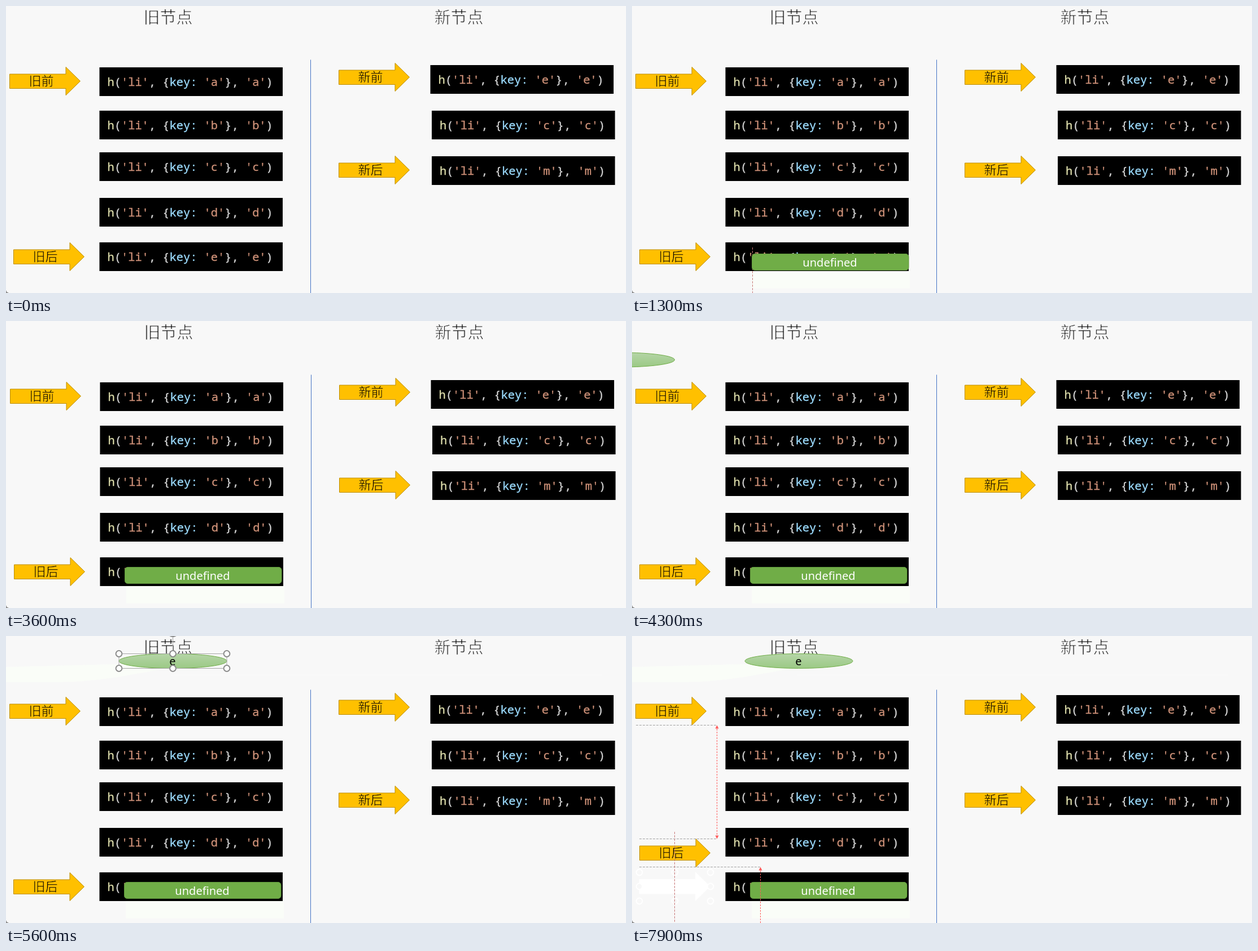
These frames come from a looping animation (1098 px wide and 510 px high, 8000 ms). An HTML page with a canvas:

```html
<!DOCTYPE html>
<html lang="zh-CN">
<head>
<meta charset="utf-8">
<title>新旧节点对比</title>
<style>
html, body { margin: 0; width: 100%; height: 100%; overflow: hidden; background: #f8f8f8; }
canvas { display: block; }
</style>
</head>
<body>
<canvas id="stage" width="1098" height="510"></canvas>
<script>
const ctx = document.getElementById('stage').getContext('2d');
const LOOP = 8000, STEP = 100;
const CJK = '"Noto Sans CJK SC", "Noto Sans CJK", sans-serif';
const MONO = '20.37px "Noto Sans Mono", monospace';
const SANS = '20px "Noto Sans", sans-serif';
const CELL = 12.222;
const PAPER = '#f8f8f8', AMBER = '#ffc000', GUIDE = '#c87a7a';

const oldNodes = [['a', 165.5, 109], ['b', 165.5, 186], ['c', 165.5, 260], ['d', 165.5, 341], ['e', 165.5, 420]];
const newNodes = [['e', 751.5, 105], ['c', 754, 186], ['m', 754, 267]];

// Keyframes: time, x, y
const tagPath = [[500, 213, 503], [600, 213, 494], [700, 213, 472], [800, 213, 441],
  [1300, 213, 441], [1400, 211, 439], [1500, 210, 438]];
const bubblePath = [[4200, -85, 69], [4300, -20, 69], [4400, 70, 68], [4500, 140, 66], [4600, 197, 63],
  [4800, 253, 55], [4900, 253, 55], [5000, 262, 53], [5400, 295.5, 44.5]];
const pointerPath = [[7600, 13, 420], [7700, 13, 404], [7800, 13, 374], [7900, 13, 360]];

function track(keys, t) {
  if (t <= keys[0][0]) return keys[0].slice(1);
  for (let i = 1; i < keys.length; i++) {
    const [t0, x0, y0] = keys[i - 1], [t1, x1, y1] = keys[i];
    if (t <= t1) {
      const k = (t - t0) / (t1 - t0);
      return [x0 + (x1 - x0) * k, y0 + (y1 - y0) * k];
    }
  }
  return keys[keys.length - 1].slice(1);
}

function text(str, x, y, font, color, align = 'center') {
  ctx.font = font;
  ctx.fillStyle = color;
  ctx.textAlign = align;
  ctx.fillText(str, x, y);
}

// An outline in the ground colour thins the strokes; in the text colour it thickens them
function outlinedText(str, x, y, font, color, outline, width, align) {
  text(str, x, y, font, color, align);
  ctx.strokeStyle = outline;
  ctx.lineWidth = width;
  ctx.lineJoin = 'round';
  ctx.strokeText(str, x, y);
  ctx.lineJoin = 'miter';
}

function line(x0, y0, x1, y1, color, dash = []) {
  ctx.save();
  ctx.strokeStyle = color;
  ctx.lineWidth = 1;
  ctx.setLineDash(dash);
  ctx.beginPath();
  ctx.moveTo(x0, y0);
  ctx.lineTo(x1, y1);
  ctx.stroke();
  ctx.restore();
}

function polygon(points, fill, stroke) {
  ctx.beginPath();
  points.forEach(([x, y]) => ctx.lineTo(x, y));
  ctx.closePath();
  paint(fill, stroke);
}

function paint(fill, stroke, width = 1) {
  if (fill) { ctx.fillStyle = fill; ctx.fill(); }
  if (stroke) { ctx.strokeStyle = stroke; ctx.lineWidth = width; ctx.stroke(); }
}

function title(str, x) {
  outlinedText(str, x, 30.5, '300 29px ' + CJK, '#1a1a1a', PAPER, 0.9);
}

function codeBox([key, x, y]) {
  ctx.fillStyle = '#000';
  ctx.fillRect(x, y, 324.5, 51);
  const parts = [['h', '#dcdcaa'], ['(', '#d4d4d4'], ["'li'", '#ce9178'], [', {', '#d4d4d4'],
    ['key:', '#9cdcfe'], [' ', '#d4d4d4'], [`'${key}'`, '#ce9178'], ['}, ', '#d4d4d4'],
    [`'${key}'`, '#ce9178'], [')', '#d4d4d4']];
  let px = x + 14;
  for (const [str, color] of parts) {
    outlinedText(str, px, y + 32.8, MONO, color, color, 0.35, 'left');
    px += str.length * CELL;
  }
}

function arrowPoints(x, y) {
  return [[0, 12.5], [99.5, 12.5], [99.5, 0], [125, 25], [99.5, 50], [99.5, 38], [0, 38]]
    .map(([dx, dy]) => [x + dx, y + dy]);
}

function pointer(label, x, y) {
  polygon(arrowPoints(x + 0.5, y + 0.5), AMBER, '#bc8c00');
  outlinedText(label, x + 56.5, y + 32.7, '22px ' + CJK, '#000', AMBER, 0.5);
}

function handle(x, y, fill = '#fff', stroke = '#8c8c8c') {
  ctx.beginPath();
  ctx.arc(x, y, 5.4, 0, Math.PI * 2);
  paint(fill, stroke, 2);
}

function rotateIcon(x, y) {
  ctx.beginPath();
  ctx.arc(x, y, 9.5, 0.65, Math.PI * 2 - 0.1);
  paint('#fff', '#8c8c8c', 2);
  ctx.beginPath();
  ctx.arc(x, y, 5, 0.9, Math.PI * 2 - 0.1);
  paint(null, '#8c8c8c', 2);
  polygon([[x + 3, y - 1], [x + 17, y - 1], [x + 10, y + 7]], '#fff', '#8c8c8c');
}

function selection(x, y, w, h, sides) {
  ctx.strokeStyle = '#a6a6a6';
  ctx.lineWidth = 1;
  ctx.strokeRect(x, y, w, h);
  line(x + w / 2, y, x + w / 2, y - 30, '#a6a6a6');
  rotateIcon(x + w / 2, y - 40);
  for (const k of [0, 0.5, 1]) {
    handle(x + w * k, y);
    handle(x + w * k, y + h);
  }
  if (sides) {
    handle(x, y + h / 2);
    handle(x + w, y + h / 2);
  }
}

function tag(x, y) {
  ctx.beginPath();
  ctx.roundRect(x - 0.5, y - 0.5, 277.5, 29, 5);
  paint('#70ad47', '#5f963b');
  text('undefined', x + 137.5, y + 21.5, SANS, '#fff');
}

function bubble(x, y) {
  const shade = ctx.createLinearGradient(0, y - 13, 0, y + 13);
  shade.addColorStop(0, '#b5d5a7');
  shade.addColorStop(1, '#9bc985');
  ctx.beginPath();
  ctx.ellipse(x, y, 95.5, 13, 0, 0, Math.PI * 2);
  paint(shade, '#70ad47');
  text('e', x - 0.5, y + 7, SANS, '#000');
}

// Pale smears left behind by dragged shapes
function trails(t) {
  ctx.fillStyle = '#fafdf8';
  if (t >= 800) ctx.fillRect(212, 471, 280, 31);
  if (t >= 4400 && t < 4700) ctx.fillRect(0, 55, 110, 27);
  if (t >= 4700) {
    ctx.beginPath();
    ctx.moveTo(0, 55);
    ctx.lineTo(200, 50);
    ctx.lineTo(290, 57);
    ctx.bezierCurveTo(230, 66, 170, 82, 90, 82);
    ctx.lineTo(0, 82);
    ctx.fill();
  }
  if (t >= 4600) line(293, 69.5, 1055, 69.5, '#fbfbfb');
  if (t >= 7700) {
    polygon(arrowPoints(13, 420), '#fff', '#fff');
    for (const k of [0, 0.5, 1]) {
      for (const y of [420, 445, 471]) {
        if (k !== 0.5 || y !== 445) handle(13 + 126 * k, y, PAPER, '#fff');
      }
    }
  }
}

function arrowTip(x, y, dir) {
  polygon([[x, y], [x - 3, y + 6 * dir], [x + 3, y + 6 * dir]], '#ff5a5a');
}

function spacingGuides(y) {
  const gray = '#a3a3a3', red = '#ff5a5a', dash = [4, 2];
  line(7, 158.5, 150, 158.5, gray, dash);
  line(13, y + 0.5, 150, y + 0.5, gray, dash);
  line(13, y + 50.5, 227, y + 50.5, gray, dash);
  line(75.5, y - 12, 75.5, 510, GUIDE, dash);
  line(150.5, 160, 150.5, y - 1, red, [3, 2]);
  arrowTip(150.5, 158.5, 1);
  arrowTip(150.5, y + 0.5, -1);
  line(227.5, y + 52, 227.5, 510, red, [3, 2]);
  arrowTip(227.5, y + 50.5, 1);
}

function draw(t) {
  ctx.setTransform(1, 0, 0, 1, 0, 0);
  ctx.fillStyle = PAPER;
  ctx.fillRect(0, 0, 1098, 510);
  polygon([[0, 505], [1.5, 508], [5, 510], [0, 510]], '#8a8a8a');

  if (t >= 3600 && t < 4200) ctx.translate(1, 0);

  trails(t);
  title('旧节点', 287);
  title('新节点', 802);
  line(539.5, 95.5, 539.5, 510, '#4472c4');

  oldNodes.forEach(codeBox);
  newNodes.forEach(codeBox);
  pointer('旧前', 6, 108);
  pointer('新前', 589, 101);
  pointer('新后', 589, 266);
  const [px, py] = track(pointerPath, t);
  pointer('旧后', px, py);

  if (t >= 500) {
    const [x, y] = track(tagPath, t);
    if (t >= 700 && t < 1400) line(213.5, 429, 213.5, 510, GUIDE, [4, 2]);
    tag(x, y);
    if (t >= 1500 && t < 2000) selection(x - 0.5, y - 0.5, 277.5, 29, false);
  }

  if (t >= 4200) {
    const [x, y] = track(bubblePath, t);
    if (t >= 4800 && t < 5000) line(348.5, 27, 348.5, 480, GUIDE, [4, 2]);
    bubble(x, y);
    if (t >= 5600 && t < 7000) selection(200, 31.5, 191, 26, false);
  }

  if (t >= 7000 && t < 7700) {
    selection(13, 420, 125.5, 51, true);
    handle(112, 420, '#eea02d');
    handle(13, 433, '#eea02d');
  }
  if (t >= 7700) spacingGuides(py);
}

const start = performance.now();
function tick(now) {
  const t = Math.max(0, now - start) % LOOP;
  draw(Math.floor(t / STEP) * STEP);
  requestAnimationFrame(tick);
}
draw(0);
requestAnimationFrame(tick);
</script>
</body>
</html>
```
